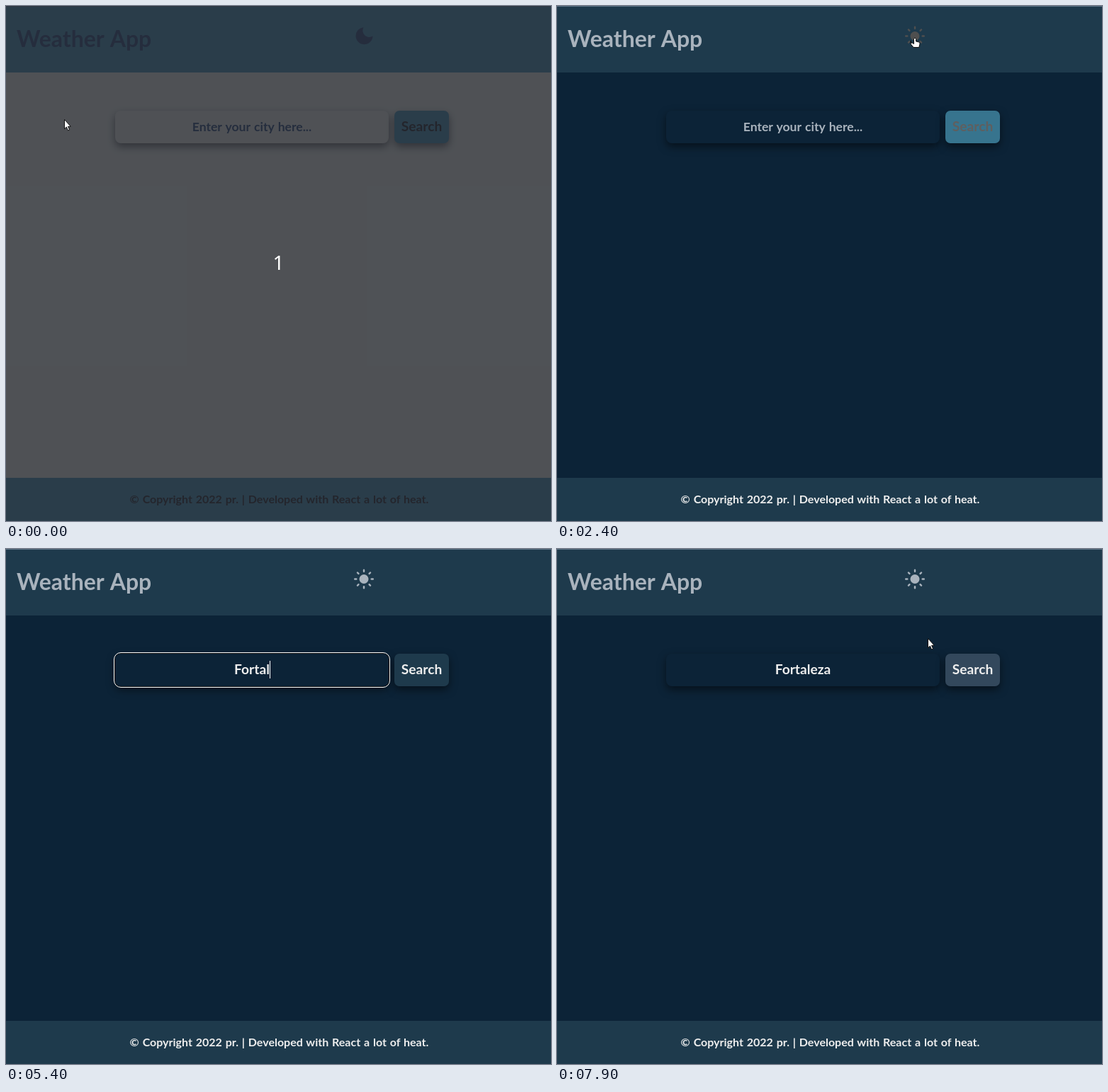
An HTML page that plays this animation: 769 by 728 pixels, repeating every 8000 ms.

```html
<!DOCTYPE html>
<html lang="en">
<head>
<meta charset="utf-8">
<title>Weather App</title>
<style>
  html, body { margin: 0; width: 100%; height: 100%; overflow: hidden; }
  #stage {
    --bg: #e8ebdd; --bar: #418daa; --title: #27456f; --text: #222;
    --shadow: 0 5px 12px rgba(0, 0, 0, .6);
    position: relative; width: 769px; height: 728px; overflow: hidden;
    background: var(--bg);
  }
  #stage.dark {
    --bg: #0c2337; --bar: #1e3a4c; --title: #a9b3bd; --text: #eee;
    --shadow: 0 5px 12px rgba(0, 0, 0, .5);
  }
  #stage > * { position: absolute; box-sizing: border-box; }
  .bar { left: 0; width: 100%; background: var(--bar); }
  header { top: 0; height: 94px; border-top: 1px solid #5c7385; }
  footer { top: 667px; height: 61px; }
  .field, .button { top: 148px; height: 46px; box-shadow: var(--shadow); }
  .field { left: 154px; width: 386px; border-radius: 8px; background: var(--bg); }
  .focused .field {
    outline: 1px solid #fff; outline-offset: 1px;
    box-shadow: 0 0 0 1px #101010, var(--shadow);
  }
  .button { left: 548px; width: 77px; border-radius: 7px; }
  svg { left: 0; top: 0; }
  text { font: 700 19.2px Lato, "Open Sans", sans-serif; word-spacing: .06em; fill: var(--text); }
  .mid { text-anchor: middle; }
  .title { font-size: 32px; fill: var(--title); }
  .hint { font-size: 17.6px; fill: var(--title); }
  .foot { font-size: 16px; }
  .count { font: 400 28px "Noto Sans", sans-serif; fill: #fff; }
  #sun, .dark #moon { display: none; }
  .dark #sun { display: inline; }

  /* Paused animations, scrubbed by the clock through --at */
  .button, .label, .icon { animation: 8s infinite paused; animation-delay: var(--at, 0s); }
  .button { animation-name: button; }
  .label { animation-name: label; }
  .icon { animation-name: icon; }
  @keyframes button {
    0%, 28.75% { background: #418daa; }
    35%, 87.5% { background: #1e3a4c; }
    93.75% { background: #48566c; }
    96.25% { background: #48566c; animation-timing-function: linear; }
    100% { background: #294154; }
  }
  @keyframes label {
    0%, 28.75% { fill: #222; }
    35%, 100% { fill: #eee; }
  }
  @keyframes icon {
    0%, 18.75% { color: #27456f; }
    21.25% { color: #222; }
    28.75% { color: #222; animation-timing-function: linear; }
    32.5% { color: #a9a9a9; }
    36.25%, 100% { color: #a9b3bd; }
  }
</style>
</head>
<body>
<div id="stage">
  <header class="bar"></header>
  <footer class="bar"></footer>
  <div class="field"></div>
  <div class="button"></div>
  <svg width="769" height="728" viewBox="0 0 769 728">
    <defs>
      <path id="arrow" d="M.5.5V13.8L3.4 11 5.5 16 7.6 15.1 5.5 10.3H9.3Z" fill="#fff" stroke="#111" stroke-linejoin="round"/>
      <path id="hand" d="M-1.5 1.3Q0-.8 1.5 1.3V5L5.6 6Q7.2 6.5 7 8.5L5.8 13.5H-2L-5.8 8.8Q-6-.0 -5.6 7.2Q-4 6.4-1.5 8.6Z" fill="#fff" stroke="#111"/>
      <g id="beam" fill="none">
        <path d="M-3-7.5H3M0-7.5V7.5M-3 7.5H3" stroke="#222" stroke-width="2.4"/>
        <path d="M-3-7.5H3M0-7.5V7.5M-3 7.5H3" stroke="#bbb"/>
      </g>
    </defs>

    <text class="title" x="15" y="58">Weather App</text>
    <g class="icon" fill="currentColor" stroke="none">
      <path id="moon" d="M504.5 30.3A12 12 0 1 0 517.5 42.5A9.2 9.2 0 0 1 504.5 30.3Z"/>
      <g id="sun" transform="translate(505 42.5)">
        <circle r="6.5"/>
        <g id="rays" stroke="currentColor" stroke-width="2.4" stroke-linecap="round"></g>
      </g>
    </g>
    <text class="hint mid" id="hint" x="347" y="177">Enter your city here...</text>
    <text class="mid" id="typed" x="347" y="177"></text>
    <rect id="caret" y="158" width="1" height="25" fill="#fff"/>
    <text class="label mid" x="586.5" y="177">Search</text>
    <text class="foot mid" x="385.5" y="703">© Copyright 2022 pr. | Developed with React a lot of heat.</text>

    <g id="countdown">
      <rect width="769" height="728" fill="rgb(36 39 48 / .78)"/>
      <text class="count mid" x="384.5" y="373">1</text>
    </g>
    <use id="cursor"/>
  </svg>
</div>

<script>
  const LOOP = 8000, TICK = 100, CITY = "Fortaleza";
  const $ = id => document.getElementById(id);
  const stage = $("stage"), typed = $("typed"), cursor = $("cursor");

  // [time, shape, x, y]
  const pointer = [
    [0, "arrow", 82, 160], [400, "arrow", 89, 160],
    [600, "arrow", 110, 143], [700, "arrow", 158, 128], [800, "beam", 230, 160], [900, "beam", 296, 169],
    [1100, "beam", 335, 163], [1200, "arrow", 396, 122], [1300, "arrow", 445, 85],
    [1400, "arrow", 480, 58], [1500, "hand", 500, 46], [1600, "hand", 505, 45],
    [2500, "hand", 502, 49], [2600, "arrow", 470, 90], [2700, "arrow", 418, 130],
    [2800, "beam", 378, 163], [2900, "beam", 358, 171],
    [4500, "", 0, 0],
    [6600, "beam", 367, 173], [6700, "beam", 385, 172], [6800, "beam", 430, 170],
    [6900, "beam", 485, 169], [7000, "hand", 556, 166], [7100, "hand", 574, 167], [7200, "hand", 583, 168],
    [7700, "hand", 573, 160], [7800, "arrow", 546, 141], [7900, "arrow", 523, 126]
  ];

  // [time, letters shown]
  const keys = [[0, 0], [4500, 2], [4600, 3], [5000, 4], [5100, 5], [5400, 6], [5700, 7], [5900, 8], [6100, 9]];

  const latest = (list, t) => list.findLast(([start]) => start <= t);
  const within = (t, from, to) => t >= from && t < to;
  const show = (el, on) => el.setAttribute("visibility", on ? "visible" : "hidden");

  for (let a = 0; a < 360; a += 45) {
    const ray = document.createElementNS("http://www.w3.org/2000/svg", "path");
    ray.setAttribute("d", "M10.7 0H12.8");
    ray.setAttribute("transform", `rotate(${a})`);
    $("rays").append(ray);
  }

  function draw(t) {
    stage.style.setProperty("--at", `${-t - 1}ms`);
    stage.classList.toggle("dark", t >= 2400);
    stage.classList.toggle("focused", within(t, 3100, 7500));
    show($("countdown"), t < 400);

    const count = latest(keys, t)[1];
    typed.textContent = CITY.slice(0, count);
    show($("hint"), !count);
    const half = count ? typed.getComputedTextLength() / 2 : 0;
    $("caret").setAttribute("x", Math.round(346.6 + half));
    show($("caret"), within(t, 3100, 3700) || within(t, 4200, 6700));

    const [, shape, x, y] = latest(pointer, t);
    cursor.setAttribute("href", `#${shape || "arrow"}`);
    cursor.setAttribute("transform", `translate(${x} ${y})`);
    show(cursor, shape);
  }

  const start = performance.now();
  let last = -1;
  function frame() {
    const t = Math.floor((performance.now() - start) % LOOP / TICK) * TICK;
    if (t !== last) draw(last = t);
    requestAnimationFrame(frame);
  }
  frame();
</script>
</body>
</html>
```
